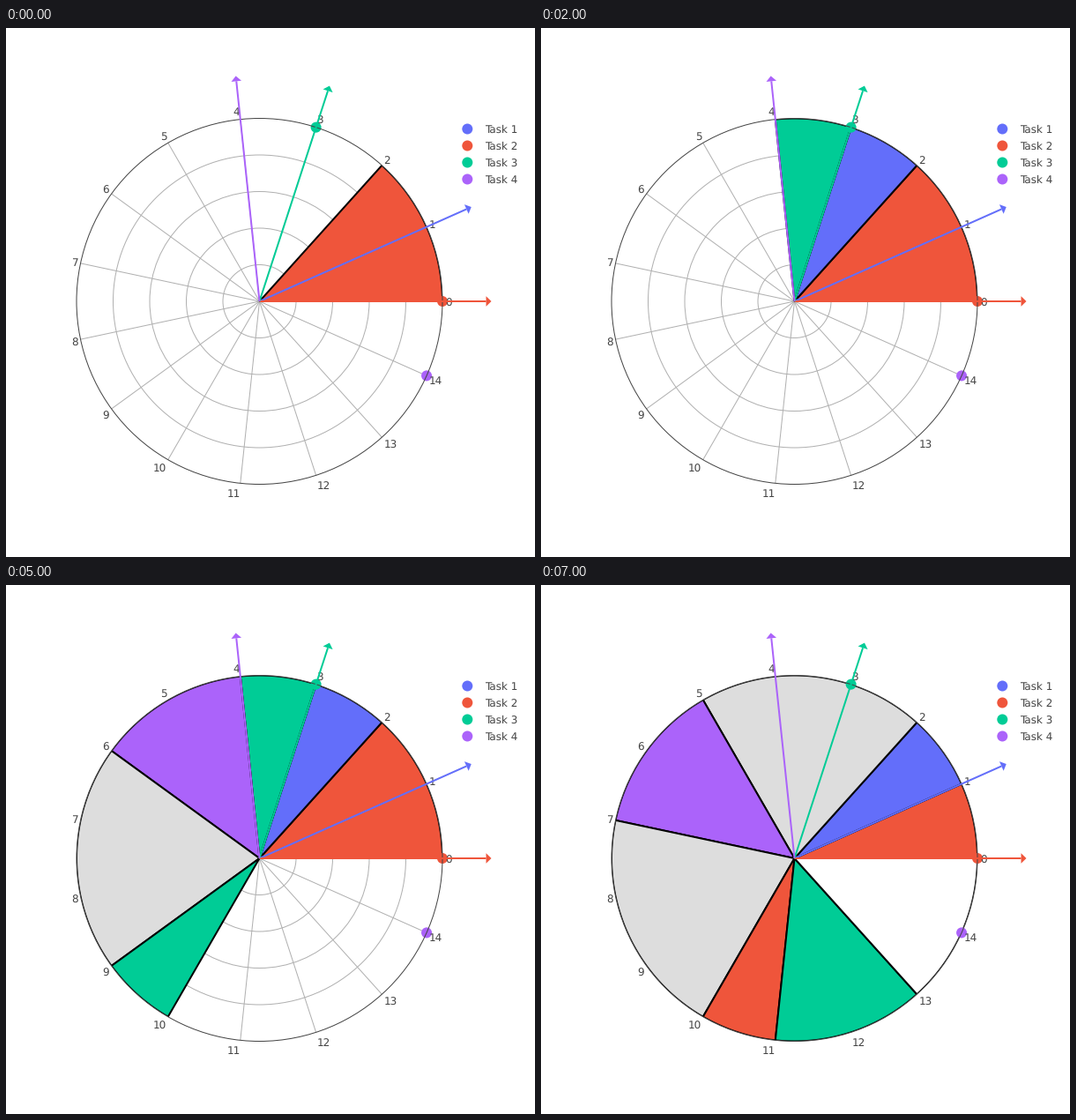
A matplotlib script for the animation above (8 s loop, 600x600 px).

```python
import numpy as np
import matplotlib.pyplot as plt
from matplotlib.animation import FuncAnimation
from matplotlib.patches import Circle, Polygon

SIZE, DPI = 600, 100
PX = 72 / DPI                      # one pixel in points
CX, CY, R = 287.5, 310, 207.5
SLOTS = 15
STEP = 360 / SLOTS

BLUE, RED, GREEN, PURPLE = "#636efa", "#ef553b", "#00cc96", "#ab63fa"
IDLE, REST = "#dddddd", "#ffffff"
TASKS = [BLUE, RED, GREEN, PURPLE]
INK, GRID = "#444444", "#b0b0b0"

# Each slice: colour and the slot where it ends.
PLAN_A = [(RED, 2), (BLUE, 3), (GREEN, 4), (PURPLE, 6), (IDLE, 9),
          (GREEN, 10), (REST, 15)]
PLAN_B = [(RED, 1), (BLUE, 2), (IDLE, 5), (PURPLE, 7), (IDLE, 10),
          (RED, 11), (GREEN, 13), (REST, 15)]

plt.rcParams.update({
    "font.family": "DejaVu Sans",
    "font.size": 12 * PX,
    "text.hinting": "none",
    "text.color": INK,
    "path.snap": False,
})

fig = plt.figure(figsize=(SIZE / DPI, SIZE / DPI), dpi=DPI, facecolor="white")
ax = fig.add_axes([0, 0, 1, 1])
ax.set(xlim=(0, SIZE), ylim=(SIZE, 0))
ax.axis("off")


def polar(r, deg):
    a = np.radians(deg)
    return CX + r * np.cos(a), CY - r * np.sin(a)


def ring(r, color, z):
    ax.add_patch(Circle((CX, CY), r, fill=False, ec=color, lw=PX, zorder=z))


def dot(x, y, color):
    ax.add_patch(Circle((x, y), 6, fc=color, lw=0, zorder=4))


def make_slices(plan):
    patches, start = [], 0
    for color, end in plan:
        x, y = polar(R, np.linspace(start, end, 120) * STEP)
        pts = np.column_stack([np.r_[CX, x], np.r_[CY, y]])
        p = Polygon(pts, fc=color, ec="black", lw=2 * PX,
                    joinstyle="bevel", zorder=3, visible=False)
        ax.add_patch(p)
        p.set_clip_path(Circle((CX, CY), R, transform=ax.transData))
        patches.append(p)
        start = end
    return patches


def arrow(slot, length, color):
    deg = slot * STEP
    tip = np.array(polar(length, deg))
    along = (tip - (CX, CY)) / length
    side = np.array([-along[1], along[0]])
    base = tip - 6 * along
    ax.plot([CX, base[0]], [CY, base[1]], color=color, lw=2 * PX,
            solid_capstyle="butt", zorder=7)
    ax.add_patch(Polygon([base - 5.8 * side, base + 5.8 * side, tip],
                         fc=color, lw=0, zorder=7))


def draw_grid():
    for k in range(1, 5):
        ring(R * k / 5, GRID, 1)
    for k in range(SLOTS):
        x, y = polar(R, k * STEP)
        ax.plot([CX, x], [CY, y], color=GRID, lw=PX,
                solid_capstyle="butt", zorder=1)
    ring(R, INK, 5)


def draw_labels():
    for k in range(SLOTS):
        a = k * STEP
        x = polar(R + 3, a)[0]
        y = polar(R, a)[1] + 1.2 - 10.1 * np.sin(np.radians(a))
        side = "left" if np.cos(np.radians(a)) > 0 else "right"
        ax.text(x, y + 4.4, str(k), ha=side, va="baseline", zorder=6)


def draw_legend():
    for i, color in enumerate(TASKS):
        y = 114.5 + 19 * i
        dot(523.3, y, color)
        ax.text(543, y + 4.4, f"Task {i + 1}", va="baseline", zorder=6)


draw_grid()
draw_labels()
draw_legend()
for slot, color in [(0, RED), (3, GREEN), (14, PURPLE)]:
    dot(*polar(R, slot * STEP), color)
for slot, length, color in [(1, 263, BLUE), (0, 263, RED),
                            (3, 257, GREEN), (4, 257, PURPLE)]:
    arrow(slot, length, color)

first = make_slices(PLAN_A)
second = make_slices(PLAN_B)


def update(i):
    # The first plan grows slice by slice, then the second replaces it.
    for k, p in enumerate(first):
        p.set_visible(i < len(first) and k <= i)
    for p in second:
        p.set_visible(i >= len(first))
    return first + second


anim = FuncAnimation(fig, update, frames=len(first) + 1, interval=1000,
                     repeat=True, repeat_delay=0, blit=False)
plt.show()
```
